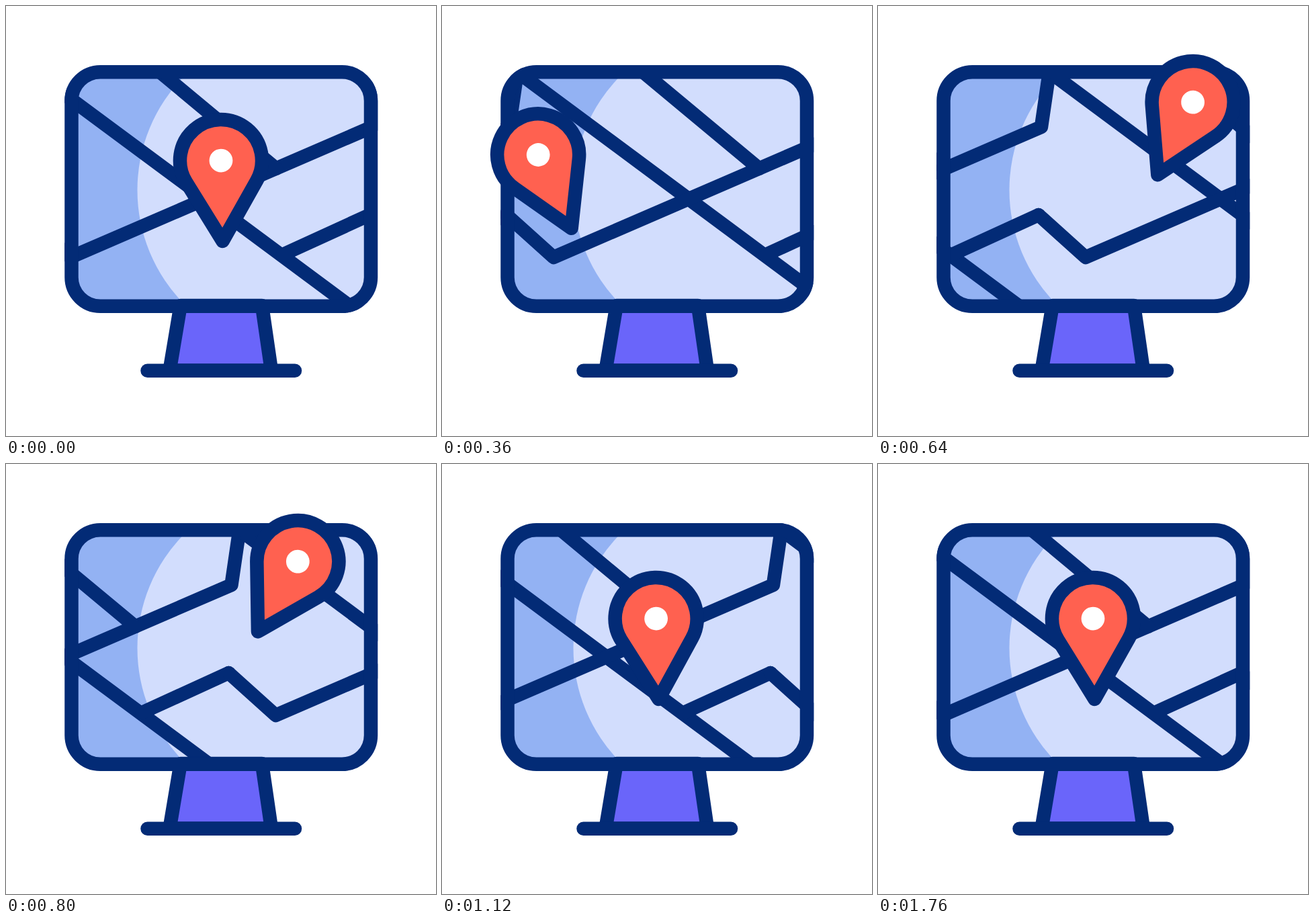
Write an HTML page that moves like this. It is 640 px wide and 640 px high and loops after 2000 ms.

```html
<!DOCTYPE html>
<html lang="en">
<head>
<meta charset="utf-8">
<title>Map pin on a monitor</title>
<style>
  html, body { margin: 0; width: 100%; height: 100%; overflow: hidden; background: #fff; }
  svg { display: block; width: 100vw; height: 100vh; }
  .line { stroke: #032b76; stroke-width: 20.5; stroke-linejoin: round; stroke-linecap: round; }
</style>
</head>
<body>
<svg viewBox="0 0 640 640" fill="none">
  <defs>
    <clipPath id="screen"><rect x="87.250" y="88" width="466" height="369" rx="53"/></clipPath>
    <!-- one tile of the road network, repeating every 515 units -->
    <g id="roads" class="line">
      <path d="M42 98L540 467.5"/>
      <path d="M557 98L545 180L96 374L26 311"/>
      <path d="M541 311L412 370"/>
      <path d="M229 98L402 242"/>
    </g>
  </defs>

  <g clip-path="url(#screen)">
    <rect x="97" y="98" width="446" height="349" rx="43" fill="#93b2f3"/>
    <circle cx="436.500" cy="274" r="241" fill="#d2ddfd"/>
    <g id="map">
      <use href="#roads" x="-515"/>
      <use href="#roads"/>
    </g>
  </g>
  <path class="line" fill="#6a65fa" stroke-width="20" d="M259.700 446H381L395 542.500H243.500Z"/>
  <path class="line" d="M210.500 542.750H430"/>
  <rect class="line" x="97.500" y="98.250" width="445.500" height="348.500" rx="43"/>

  <g id="pin">
    <path class="line" fill="#ff6150" d="M0 0L-52.500 -89A61 61 0 1 1 52.500 -89Z"/>
    <circle cy="-120" r="17.400" fill="#fff"/>
  </g>
</svg>
<script>
const LOOP = 2000, STEP = 40, TILE = 515;
const map = document.getElementById('map');
const pin = document.getElementById('pin');

const home = [322.5, 350], left = [192.3, 330.8], right = [431, 246];
// [start, end, four Bezier points]
const path = [
  [40, 370, home, home, left, left],
  [370, 688, left, left, right, right],
  [688, 1000, right, [355, 237], [322.5, 272], home]
];
// [time, lean in degrees]
const lean = [[40, 0], [370, -23.2], [712, 33.5], [1300, -10.5], [1620, 2.5], [1760, 0]];

const mix = (a, b, u) => a + (b - a) * u;

function ease(t, start, end) {
  const p = Math.min(1, Math.max(0, (t - start) / (end - start)));
  return p * p * (3 - 2 * p);
}

function bezier(a, b, c, d, u) {
  const v = 1 - u;
  return [0, 1].map(i =>
    v * v * v * a[i] + 3 * v * v * u * b[i] + 3 * v * u * u * c[i] + u * u * u * d[i]);
}

function straight(a, d, u) {
  return [mix(a[0], d[0], u), mix(a[1], d[1], u)];
}

function tipAt(t) {
  const [start, end, a, b, c, d] = path.find(s => t < s[1]) || path[2];
  const u = ease(t, start, end);
  return a === b ? straight(a, d, u) : bezier(a, b, c, d, u);
}

function leanAt(t) {
  let i = 1;
  while (i < lean.length - 1 && t >= lean[i][0]) i++;
  const [t0, a] = lean[i - 1], [t1, b] = lean[i];
  return mix(a, b, ease(t, t0, t1));
}

function draw(now) {
  const t = Math.floor(now % LOOP / STEP) * STEP;
  const [x, y] = tipAt(t);
  map.setAttribute('transform', `translate(${TILE * ease(t, 52, 1382)} 0)`);
  pin.setAttribute('transform', `translate(${x} ${y}) rotate(${leanAt(t) - 1.2})`);
}

const began = performance.now();
function tick() {
  draw(performance.now() - began);
  requestAnimationFrame(tick);
}
tick();
</script>
</body>
</html>
```
